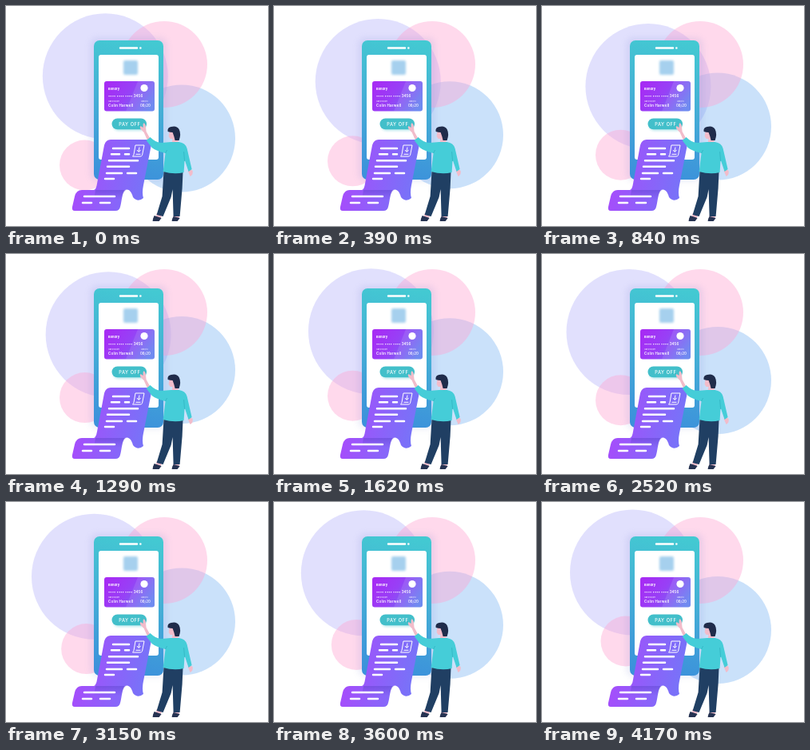
Recreate the animation shown at these times as an HTML page. Size 328 by 275 pixels, loop 4540 ms.

```html
<!DOCTYPE html>
<html lang="en">
<head>
<meta charset="utf-8">
<title>Pay off</title>
<style>
html, body { margin: 0; width: 100%; height: 100%; overflow: hidden; background: #fff; }
svg { display: block; width: 328px; height: 275px; }
text { font-family: Inter, Lato, sans-serif; fill: #fff; }
.lines { stroke: #fff; stroke-width: 2.5; stroke-linecap: round; fill: none; }
.pink { fill: #ffa0d0; opacity: .4; }
.skin { fill: #f2bcca; }
.shoe { fill: #263352; }
</style>
</head>
<body>
<svg viewBox="0 0 328 275" xmlns="http://www.w3.org/2000/svg">
  <defs>
    <linearGradient id="body" x1=".6" y1="0" x2=".5" y2="1">
      <stop offset="0" stop-color="#43c9d2"/><stop offset=".4" stop-color="#45b2d5"/><stop offset="1" stop-color="#3c91db"/>
    </linearGradient>
    <linearGradient id="card" x1="0" y1=".3" x2="1" y2=".7">
      <stop offset="0" stop-color="#a62cf4"/><stop offset=".45" stop-color="#9741f6"/><stop offset="1" stop-color="#5f7eee"/>
    </linearGradient>
    <linearGradient id="paper" gradientUnits="userSpaceOnUse" x1="95" y1="200" x2="178" y2="215">
      <stop offset="0" stop-color="#a34ffb"/><stop offset="1" stop-color="#7674f8"/>
    </linearGradient>
    <linearGradient id="fold" x1="0" y1="0" x2="0" y2="1">
      <stop offset="0" stop-color="#5a40c8" stop-opacity=".45"/><stop offset="1" stop-color="#5a40c8" stop-opacity="0"/>
    </linearGradient>
    <filter id="soft" x="-50%" y="-50%" width="200%" height="200%"><feGaussianBlur stdDeviation="1.8"/></filter>
    <filter id="shade" x="-50%" y="-50%" width="200%" height="200%"><feGaussianBlur stdDeviation="4"/></filter>
  </defs>

  <circle id="big" r="78.5" fill="#6b63f2" opacity=".2"/>
  <circle id="blue" r="67" fill="#7ab4f2" opacity=".4"/>
  <circle class="pink" cx="198" cy="73" r="54"/>
  <circle id="small" class="pink" r="31.5"/>

  <!-- phone -->
  <rect x="106" y="40" width="95" height="178" rx="8" fill="#6d74c8" opacity=".15" filter="url(#shade)"/>
  <rect x="110" y="43" width="87" height="174" rx="7" fill="url(#body)"/>
  <rect x="116" y="61" width="75" height="131" rx="3" fill="#fff"/>
  <path class="lines" d="M143 52.5H164M168.3 52.5h.1"/>
  <rect x="147" y="68" width="18" height="18" rx="2" fill="#a6d0ee" filter="url(#soft)"/>

  <!-- bank card -->
  <rect x="123" y="94" width="63" height="37.5" rx="3" fill="url(#card)"/>
  <path d="M165 94H183Q186 94 186 97V128Q186 131.5 183 131.5H150Z" fill="#fff" opacity=".1"/>
  <circle cx="173" cy="102.5" r="4.6" fill="#fff"/>
  <text x="128" y="104.5" font-size="4" font-weight="700">Bondry</text>
  <text x="128" y="113.8" font-size="4.4" font-weight="600" letter-spacing=".12">•••• •••• •••• 3456</text>
  <text x="128" y="120.4" font-size="2.5">Card holder</text>
  <text x="169" y="120.4" font-size="2.5">Valid to</text>
  <text x="128" y="126.4" font-size="4.5" font-weight="600" letter-spacing=".2">Colin Harwell</text>
  <text x="168" y="126.4" font-size="4.4" font-weight="500">08/20</text>

  <!-- button -->
  <rect x="134" y="143" width="41" height="13" rx="6.5" fill="#41bfcb" opacity=".35" filter="url(#soft)"/>
  <rect x="132.5" y="140.5" width="43.5" height="13.8" rx="6.9" fill="#42bfca"/>
  <text x="154.8" y="149.6" font-size="5.7" font-weight="500" letter-spacing=".55" text-anchor="middle">PAY OFF</text>

  <!-- receipt -->
  <path fill="url(#paper)" d="M131 167H178Q183 167 182 173L172 224Q170 234 172 240Q165 246 159 239
    C157 231 153 228 149 230C145 233 145 245 143 251Q142 256 137 256H86Q82 256 83 251
    L86 238Q88 230 95 230H110Q113 229 114 222L123 174Q125 167 131 167Z"/>
  <path fill="url(#fold)" d="M112 230H150Q146 233 145 242H110Z"/>
  <path class="lines" d="M134 178H154M132 185.3H142M149 185.3H154M129 193.2H165M127 200.8H154
    M126 209H145M152 209H163M124 216H135M98 238H136M96 246H107M118 246H130"/>
  <g fill="none" stroke="#fff">
    <path d="M162 174H173L170.500 186.500Q170 188 168 188H158.500Q160 187 160.300 184Z"/>
    <path d="M167 176.500L166 182M164 180L166 182.400L168.800 180M162.500 185.300H168.500"/>
  </g>

  <!-- person -->
  <g transform="translate(.6 0)">
    <path class="skin" d="M180 166L175 157L174 149Q172 144 171 148V152L168 150Q166 152 169 155L172 158L177 169Z"/>
    <path class="skin" d="M229 203L233 206Q234 211 230 213L227 206Z"/>
    <path class="skin" d="M188 259L195 261L193 265H187ZM209 261H216V266H209Z"/>
    <path class="shoe" d="M185 262L194 265L191 269H183Q183 266 185 262Z"/>
    <path class="shoe" d="M209 263L217 265L214 269H207Q207 266 209 263Z"/>
    <path fill="#203f63" d="M197 205H221L220 228L217 263H209L208 229L206 239L196 263L188 261L195 238Z"/>
    <path class="skin" d="M204 156L203 163L205 166L208 166L207 171H215V160Z"/>
    <path fill="#45cdd8" d="M206 170H216Q224 171 226 178L232 204L228 207L223 192L222 208Q210 211 196 207L199 184Q187 181 182 177L175 168L180 164Q187 171 194 171Z"/>
    <path fill="none" stroke="#32b3c2" stroke-width=".8" d="M222 182L223 194M199 184L201 180"/>
    <path fill="#202c4b" d="M202 157Q201 152 206 151Q213 149 216 154Q219 160 216 168L211 168Q210 163 208 158Q205 158 202 157Z"/>
  </g>
</svg>
<script>
const LOOP = 4540, LAST = 4170, STEP = 30;

// Eased drift between turning points [time, value]
function swing(t, points) {
  const next = points.findIndex(([time]) => time > t);
  if (next === 0) return points[0][1];
  if (next < 0) return points[points.length - 1][1];
  const [t0, a] = points[next - 1], [t1, b] = points[next];
  return a + (b - a) * (1 - Math.cos(Math.PI * (t - t0) / (t1 - t0))) / 2;
}

function place(id, x, y) {
  const circle = document.getElementById(id);
  circle.setAttribute("cx", x);
  circle.setAttribute("cy", y);
}

const start = performance.now();

function draw() {
  const now = (performance.now() - start) % LOOP;
  const t = Math.min(Math.floor(now / STEP) * STEP, LAST);
  place("big",
    swing(t, [[-500, 120], [780, 133], [2500, 109], [4170, 113.5]]),
    swing(t, [[-600, 82.5], [1100, 101.5], [1950, 94.3], [2550, 97.5], [3850, 88]]));
  place("blue", 220, swing(t, [[0, 165.5], [1290, 145], [2520, 158], [3150, 149.5], [4170, 160]]));
  place("small",
    swing(t, [[2500, 98.5], [4170, 105]]),
    swing(t, [[-400, 201], [1750, 177], [2900, 184.5], [4170, 174]]));
  requestAnimationFrame(draw);
}
draw();
</script>
</body>
</html>
```
